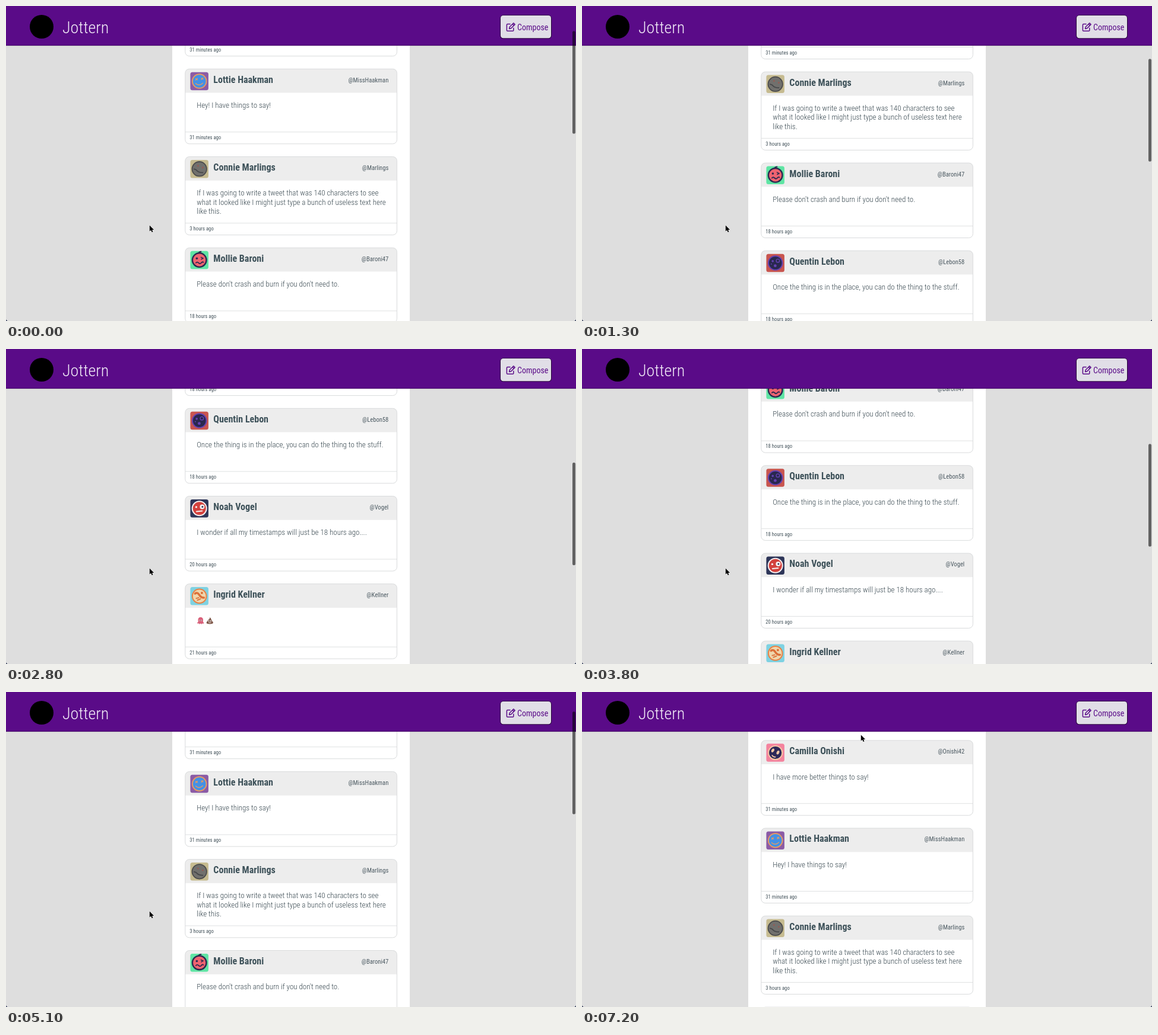
An HTML page for the animation above (7300 ms loop, 960 by 532 pixels).

```html
<!DOCTYPE html>
<html lang="en">
<head>
<meta charset="utf-8">
<title>Jottern</title>
<style>
html, body { margin: 0; width: 100%; height: 100%; overflow: hidden; background: #dedede; }
svg { display: block; width: 100vw; height: 100vh; }
text { font-family: "Roboto Condensed", Roboto, sans-serif; font-stretch: 75%; white-space: pre; }
.plain { font-family: Roboto, sans-serif; font-stretch: 100%; }
.title { font-size: 28px; font-weight: 300; fill: #f3eef8; }
.button { font-size: 14px; font-weight: 400; fill: #5a0b88; }
.name { font-size: 16px; font-weight: 700; fill: #3d5159; }
.handle { font-size: 10.6px; font-weight: 400; fill: #4c5a62; }
.body { font-size: 13px; font-weight: 300; fill: #37474f; }
.time { font-size: 8.7px; font-weight: 400; fill: #43525a; }
</style>
</head>
<body>
<svg id="stage" viewBox="0 0 960 532" preserveAspectRatio="none">
  <rect width="960" height="532" fill="#dedede"/>
  <g id="page"><rect x="280" y="60" width="400" height="1400" fill="#fff"/></g>
  <g id="bar">
    <rect width="960" height="67" fill="#5a0b88"/>
    <rect y="66" width="960" height="1" fill="#4a0a70"/>
    <rect y="67" width="960" height="1" fill="#000" opacity=".1"/>
    <circle cx="60" cy="35" r="20" fill="#000"/>
    <rect x="832" y="15.3" width="87" height="40" rx="5.5" fill="#260538"/>
    <rect x="833" y="16" width="85" height="38.3" rx="4.5" fill="#e1dee7"/>
    <g fill="none" stroke="#5a0b88" stroke-width="1.5" stroke-linejoin="round" stroke-linecap="round">
      <path d="M849 30.5H844.8Q843.4 30.5 843.4 32V41Q843.4 42.3 844.8 42.3H853.4Q854.8 42.3 854.8 41V37.2"/>
      <path d="M847.6 38.4L848.3 35.3L854.8 28.8L857.1 31.1L850.6 37.7ZM853.2 30.4L855.5 32.7"/>
    </g>
  </g>
  <rect id="thumb" x="954" width="5" height="173.5" rx="2.5" fill="#000" opacity=".56"/>
  <path d="M0 529Q.4 531.6 3 532H0ZM960 529Q959.6 531.6 957 532H960Z" fill="#1c2748"/>
  <path id="cursor" d="M0 0V10L2.3 8L3.9 11.4L5.7 10.6L4.2 7.3H7.3Z" fill="#000" stroke="#fff" stroke-width=".9" stroke-linejoin="round" paint-order="stroke"/>
</svg>
<script>
(() => {
const NS = "http://www.w3.org/2000/svg";
const $ = id => document.getElementById(id);

function add(parent, tag, attrs, content) {
  const el = document.createElementNS(NS, tag);
  for (const k in attrs) el.setAttribute(k, attrs[k]);
  if (content) el.textContent = content;
  parent.appendChild(el);
  return el;
}

// Use a general narrowing only when no condensed face is available.
function narrowing() {
  const sample = "The quick brown fox jumps";
  const width = cls => {
    const el = add($("stage"), "text", { class: cls, "font-size": 40 }, sample);
    const w = el.getComputedTextLength();
    el.remove();
    return w;
  };
  return width("") > width("plain") * .96 ? .885 : 1;
}
const squeeze = narrowing();

function label(parent, cls, x, y, str, anchor = "start") {
  add(parent, "text", { class: cls, "text-anchor": anchor, transform: `translate(${x} ${y}) scale(${squeeze} 1)` }, str);
}

// Faces sit in a 30 by 30 box.
const line = (d, c, w = 1.5) => `<path d="${d}" fill="none" stroke="${c}" stroke-width="${w}" stroke-linecap="round"/>`;
const dot = (x, y, r, c) => `<circle cx="${x}" cy="${y}" r="${r}" fill="${c}"/>`;
const face = (bg, ring, skin, r, w, marks) =>
  `<rect width="30.5" height="30.5" rx="3.5" fill="${bg}"/>` +
  `<circle cx="15.3" cy="15.3" r="${r}" fill="${skin}" stroke="${ring}" stroke-width="${w}"/>` + marks;

const faces = {
  pink: face("#f4839e", "#f5c6a4", "#2d2858", 11.6, 2,
    `<ellipse cx="11" cy="11.5" rx="2.2" ry="3.4" transform="rotate(30 11 11.5)" fill="#f5c6a4"/>` +
    `<ellipse cx="19.6" cy="15" rx="2.2" ry="3.4" transform="rotate(25 19.6 15)" fill="#f5c6a4"/>` +
    line("M10 20Q12 23 15 22.6", "#f5c6a4", 2)),
  purple: face("#8b5ba6", "#e59a63", "#4391e6", 11.8, 2,
    line("M9 11L12 13M9 13.5L12 10.6M18.5 10L21.5 12M18.5 12.6L21.4 9.6", "#e59a63", 1.3) +
    line("M9 19Q15 24.5 21 18.5", "#e59a63", 1.4)),
  khaki: face("#c6bb90", "#4b4b4c", "#71706d", 12.2, 1.8,
    dot(13, 10, 1.3, "#9c5850") + dot(21, 13, 1.3, "#9c5850") +
    line("M6.5 15.5Q10 16 12 19Q15 21.5 21 21.5", "#454648", 1.8)),
  green: face("#5fe5a4", "#2b2a50", "#ef6370", 11.8, 2.4,
    line("M14 3Q16 1 18 1", "#2b2a50", 2) + dot(11, 12.5, 1.8, "#2b2a50") +
    line("M18 10.5L21.5 12.2L18.5 14", "#2b2a50") +
    line("M9.5 20Q11.5 17.5 14 20T18.5 20T22 19", "#2b2a50", 1.8)),
  red: face("#c8554f", "#6441b2", "#29284f", 11.8, 2,
    `<circle cx="19.5" cy="11.5" r="2.8" fill="none" stroke="#6441b2" stroke-width="1.4"/>` +
    dot(10.8, 12.2, 1.8, "#6441b2") + dot(15, 20, 2.4, "#6441b2") + dot(8.5, 17, 1, "#6441b2")),
  navy: face("#2d3558", "#f5eff0", "#d3413d", 12, 2,
    dot(20, 12.5, 4, "#f5eff0") + dot(20.5, 12.5, 1.5, "#2d3558") + dot(10, 13, 1.7, "#f5eff0") +
    line("M10.5 20.5L20 19.5", "#f5eff0", 2)),
  cyan: face("#7ed2e2", "#e98145", "#efd6ac", 11.8, 2,
    line("M8 11Q12 8 15 13T23 18", "#dc7039", 3.5) +
    line("M10 19L14 18M12 22L17 20", "#dc7039", 2) + dot(19.5, 10, 2, "#dc7039"))
};

const posts = [
  ["Camilla Onishi", "@Onishi42", "pink", "31 minutes ago", ["I have more better things to say!"]],
  ["Lottie Haakman", "@MissHaakman", "purple", "31 minutes ago", ["Hey! I have things to say!"]],
  ["Connie Marlings", "@Marlings", "khaki", "3 hours ago", [
    "If I was going to write a tweet that was 140 characters to see",
    "what it looked like I might just type a bunch of useless text here",
    "like this."]],
  ["Mollie Baroni", "@Baroni47", "green", "18 hours ago", ["Please don't crash and burn if you don't need to."]],
  ["Quentin Lebon", "@Lebon58", "red", "18 hours ago", ["Once the thing is in the place, you can do the thing to the stuff."]],
  ["Noah Vogel", "@Vogel", "navy", "20 hours ago", ["I wonder if all my timestamps will just be 18 hours ago...."]],
  ["Ingrid Kellner", "@Kellner", "cyan", "21 hours ago", []]
];

function emoji(g) {
  add(g, "g", { transform: "translate(321 56)" }).innerHTML =
    `<path d="M2.5 5Q2.5 .5 6.7 .5T11 5Q10.6 7 11 8.5L12.7 10.5Q11 12 9.4 10.8L8.8 12.5L6.7 11.2L4.6 12.5L4 10.8Q2 12 .7 10.2L2.7 8.5Z" fill="#d9607a"/>` +
    dot(5.2, 6, 1, "#fff") + dot(8.2, 6, 1, "#fff") + dot(5.3, 6.2, .5, "#222") + dot(8.1, 6.2, .5, "#222");
  add(g, "g", { transform: "translate(337 56)" }).innerHTML =
    `<path d="M6 1Q8.8 2 8.3 4.3Q10.3 5 9.9 7.2Q12.4 8.3 11.8 10.6Q11 12 6.2 12T.6 10.6Q.2 8.3 2.6 7.2Q2.4 5 4.3 4.5Q6.3 3.6 6 1Z" fill="#7d5647"/>` +
    dot(4.6, 6.8, 1, "#fff") + dot(7.8, 6.8, 1, "#fff") + line("M4.3 9.4Q6.2 10.8 8.2 9.4", "#fff", .9);
}

// Draws one post and returns the distance to the next.
function card([name, handle, look, age, lines], y) {
  const h = lines.length > 1 ? 132.2 : 126.5;
  const g = add($("page"), "g", { transform: `translate(0 ${y})` });
  add(g, "rect", { x: 301.8, y: .3, width: 356.6, height: h, rx: 7, fill: "#fff" });
  add(g, "path", { d: "M301.8 40.5V7.3Q301.8 .3 308.8 .3H651.4Q658.4 .3 658.4 7.3V40.5Z", fill: "#ededed" });
  add(g, "rect", { x: 302, y: h - 20.2, width: 356.4, height: 1, fill: "#dfe1e2" });
  add(g, "rect", { x: 301.8, y: .3, width: 356.6, height: h, rx: 7, fill: "none", stroke: "#d9dbdc" });
  add(g, "g", { transform: "translate(310.4 5.7)" }).innerHTML = faces[look];
  label(g, "name", 349.3, 23.7, name);
  label(g, "handle", 644.3, 22.7, handle, "end");
  lines.forEach((str, i) => label(g, "body", 321.2, 66 + i * 15.4, str));
  if (!lines.length) emoji(g);
  label(g, "time", 309.3, h - 7.3, age);
  return h + 21.7;
}
let cardY = 81.5;
for (const post of posts) cardY += card(post, cardY);

label($("bar"), "title", 95, 45.5, "Jottern");
label($("bar"), "button", 861, 40.6, "Compose");

// Scroll position over time; below zero the page is pulled past its top.
const scrollKeys = [
  [0, 123.7], [1300, 267], [2100, 432], [2800, 580], [3050, 594], [3800, 483.5],
  [4600, 287], [5400, 6], [5550, -12], [5900, -2.6], [6500, 0], [7300, 0]
];

function slope(keys, i) {
  const rate = j => (keys[j + 1][1] - keys[j][1]) / (keys[j + 1][0] - keys[j][0]);
  if (i === 0) return rate(0);
  if (i === keys.length - 1) return rate(i - 1);
  const a = rate(i - 1), b = rate(i);
  return a * b > 0 ? 2 * a * b / (a + b) : 0;
}

function curve(keys, t) {
  let i = 0;
  while (i < keys.length - 2 && t >= keys[i + 1][0]) i++;
  const [t0, a] = keys[i], [t1, b] = keys[i + 1];
  const d = t1 - t0, u = (t - t0) / d, v = 1 - u;
  return a * (1 + 2 * u) * v * v + b * (3 - 2 * u) * u * u +
    d * u * v * (slope(keys, i) * v - slope(keys, i + 1) * u);
}

const clamp = x => Math.min(1, Math.max(0, x));
const ease = x => x * x * (3 - 2 * x);

function draw(t) {
  const s = curve(scrollKeys, t);
  $("page").setAttribute("transform", `translate(0 ${-s})`);
  $("bar").setAttribute("transform", `translate(0 ${Math.max(0, -s)})`);
  $("thumb").setAttribute("y", 1.6 + Math.max(0, s) * .328);
  $("thumb").setAttribute("opacity", .56 * (1 - clamp((t - 6500) / 300)));
  const m = ease(clamp((t - 6300) / 850));
  $("cursor").setAttribute("transform", `translate(${241.8 + 228 * m} ${370.6 - 298 * m})`);
}

const LOOP = 7300, STEP = 100;
const start = performance.now();
function tick() {
  const t = (performance.now() - start) % LOOP;
  draw(Math.floor(t / STEP) * STEP);
  requestAnimationFrame(tick);
}
tick();
})();
</script>
</body>
</html>
```
